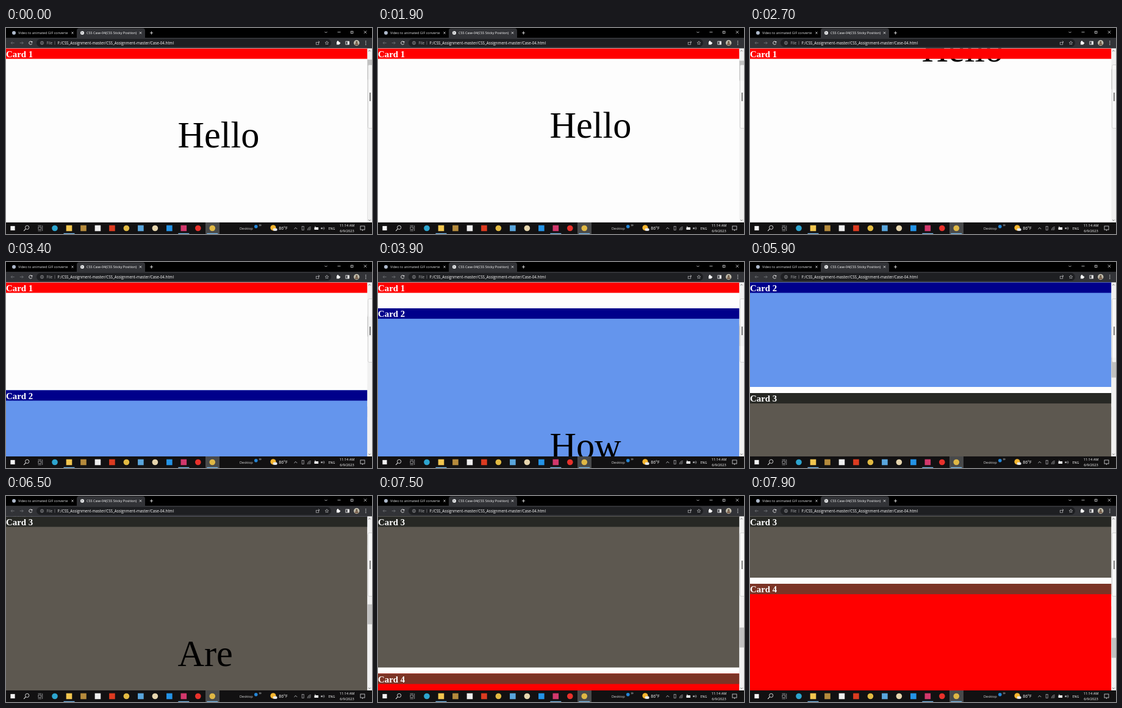
These frames come from a looping animation (600 by 338 pixels, 8 s). An HTML page with a canvas:

```html
<!DOCTYPE html>
<html lang="en">
<head>
<meta charset="utf-8">
<title>Sticky cards</title>
<style>
html, body { margin: 0; width: 100%; height: 100%; overflow: hidden; background: #000; }
canvas { display: block; width: 600px; height: 338px; }
</style>
</head>
<body>
<canvas id="stage" width="600" height="338"></canvas>
<script>
const ctx = document.getElementById('stage').getContext('2d');
const LOOP = 8000, STEP = 100;
const UI = '"Open Sans", "Noto Sans", sans-serif';
const SERIF = '"Liberation Serif", "Times New Roman", serif';
const PALE = '#dedfe1', WHITE = '#fff', GREY = '#a8a9ab', BAR = '#323337';

// Page geometry
const TOP = 33.5, BOTTOM = 319, PAGE_W = 592.5, VIEW = BOTTOM - TOP;
const PITCH = 590, GAP = 10, HEAD = 17.1, WORD_BASE = 246;
const TRACK_TOP = 41, TRACK_H = 271, PAGE_H = PITCH * 4;

const CARDS = [
  { head: '#ff0000', body: '#fdfdfd', word: 'Hello' },
  { head: '#00008b', body: '#6495ed', word: 'How' },
  { head: '#272824', body: '#5d5850', word: 'Are' },
  { head: '#7b3426', body: '#ff0000', word: '' }
];

// The wheel changes speed at these points and rests briefly at PAUSE.
const PAUSE = 7200;
const WHEEL = [
  { t: 1800, y: 84 }, { t: 2700, y: 225 }, { t: 3900, y: 547.5 },
  { t: 5900, y: 998.5 }, { t: 6500, y: 1180.5 }, { t: 7800, y: 1659.5 }
];

function scrollAt(time) {
  const t = time > PAUSE ? Math.max(PAUSE, time - STEP) : time;
  let y = WHEEL[0].y;
  for (let i = 1; i < WHEEL.length; i++) {
    const a = WHEEL[i - 1], b = WHEEL[i];
    const part = Math.min(1, Math.max(0, (t - a.t) / (b.t - a.t)));
    y += (b.y - a.y) * part;
  }
  return y;
}

function rect(x, y, w, h, color) {
  ctx.fillStyle = color;
  ctx.fillRect(x, y, w, h);
}

function square(x, y, r, color) {
  rect(x - r, y - r, 2 * r, 2 * r, color);
}

function disc(x, y, r, color) {
  ctx.fillStyle = color;
  ctx.beginPath();
  ctx.arc(x, y, r, 0, Math.PI * 2);
  ctx.fill();
}

function round(x, y, w, h, r, color) {
  ctx.fillStyle = color;
  ctx.beginPath();
  ctx.roundRect(x, y, w, h, r);
  ctx.fill();
}

function ring(x, y, r, color, from = 0, to = Math.PI * 2) {
  ctx.strokeStyle = color;
  ctx.lineWidth = 0.8;
  ctx.beginPath();
  ctx.arc(x, y, r, from, to);
  ctx.stroke();
}

function frame(x, y, w, h, color) {
  ctx.strokeStyle = color;
  ctx.lineWidth = 0.8;
  ctx.strokeRect(x, y, w, h);
}

function line(x1, y1, x2, y2, color, width = 0.8) {
  ctx.strokeStyle = color;
  ctx.lineWidth = width;
  ctx.beginPath();
  ctx.moveTo(x1, y1);
  ctx.lineTo(x2, y2);
  ctx.stroke();
}

// Angle mark whose tip points right, turned by a number of quarter turns
function chevron(x, y, r, turns, color) {
  ctx.save();
  ctx.translate(x, y);
  ctx.rotate(turns * Math.PI / 2);
  line(-r / 2, -r, r / 2, 0, color);
  line(-r / 2, r, r / 2, 0, color);
  ctx.restore();
}

function cross(x, y, r, color) {
  line(x - r, y - r, x + r, y + r, color);
  line(x - r, y + r, x + r, y - r, color);
}

function text(str, x, y, size, color = WHITE, family = UI, weight = 400) {
  ctx.font = `${weight} ${size}px ${family}`;
  ctx.fillStyle = color;
  ctx.fillText(str, x, y);
}

function clipped(x, y, w, h, paint) {
  ctx.save();
  ctx.beginPath();
  ctx.rect(x, y, w, h);
  ctx.clip();
  paint();
  ctx.restore();
}

function drawCard(card, i, scroll) {
  const y = TOP + i * PITCH - scroll;
  const end = y + PITCH - GAP;
  rect(0, y, PAGE_W, end - y, card.body);
  text(card.word, 281.4, y + WORD_BASE, 60.3, '#000', SERIF);
  const headY = Math.min(Math.max(y, TOP), end - HEAD - GAP);
  rect(0, headY, PAGE_W, HEAD, card.head);
  text(`Card ${i + 1}`, 0, headY + 14.2, 14.9, WHITE, SERIF, 700);
}

function drawPage(scroll) {
  clipped(0, TOP, PAGE_W, VIEW, () => {
    rect(0, TOP, PAGE_W, VIEW, '#fdfdfd');
    CARDS.forEach((card, i) => drawCard(card, i, scroll));
  });
}

function drawScrollbar(scroll) {
  rect(PAGE_W, TOP, 8, VIEW, '#f1f1f1');
  const thumbY = TRACK_TOP + (scroll + GAP) / PAGE_H * TRACK_H;
  rect(PAGE_W, thumbY, 8, TRACK_H * VIEW / PAGE_H, '#c1c1c1');
  chevron(596, 37.5, 1.8, -1, '#505050');
  chevron(596, 315.5, 1.8, 1, '#505050');
  round(593.5, 60.5, 12, 104, 2, 'rgba(250,250,250,.88)');
  ctx.strokeStyle = '#c9c9c9';
  ctx.lineWidth = 0.8;
  ctx.stroke();
  rect(596.2, 106, 1.4, 14, '#444');
}

function drawTabs() {
  rect(0, 0, 600, 17, '#000');
  disc(13, 8, 3, '#aeb9cb');
  clipped(20, 0, 81, 16, () => text('Video to animated GIF converter', 20, 9.9, 5.55, PALE));
  cross(109, 8, 1.6, PALE);

  round(116, 0.5, 112, 20, 4, BAR);
  disc(125, 8, 3.1, '#e4e5e7');
  chevron(124.5, 8, 1.7, 0, '#55585c');
  text('CSS Case-04(CSS Sticky Position)', 132, 9.9, 5.5);
  cross(220.5, 8, 1.6, WHITE);
  line(236, 8, 241, 8, WHITE);
  line(238.5, 5.5, 238.5, 10.5, WHITE);

  chevron(524.5, 7, 2, 1, PALE);
  line(543.5, 6.8, 548.5, 6.8, PALE);
  frame(565.5, 5.3, 3.4, 3.4, PALE);
  cross(589, 6.8, 2.2, PALE);
}

function drawToolbar() {
  rect(0, 16, 600, 17.5, BAR);
  for (const side of [-1, 1]) {
    const x = 18.2 + side * 7.2;
    line(x - 2.7, 24.5, x + 2.7, 24.5, '#77797d');
    chevron(x + side * 1.7, 24.5, 2.2, 1 - side, '#77797d');
  }
  ring(40.3, 24.5, 2.6, WHITE, 0.3, 5.5);
  square(42.4, 22.9, 0.9, WHITE);

  round(50, 18, 483, 13, 6.5, '#1e1f22');
  ring(59, 24.5, 2.5, GREY);
  line(59, 23, 59, 26, GREY);
  text('File', 66.5, 26.6, 6.2, GREY);
  line(80, 21.5, 80, 27.5, '#74767a');
  text('F:/CSS_Assignment-master/CSS_Assignment-master/Case-04.html', 84.5, 26.6, 6.25);

  frame(508.3, 23.5, 4.4, 3.6, GREY);
  chevron(513, 23, 1.7, 0, PALE);
  ctx.beginPath();
  for (let i = 0; i < 10; i++) {
    const a = -Math.PI / 2 + i * Math.PI / 5, r = i % 2 ? 1.4 : 3;
    ctx.lineTo(526 + r * Math.cos(a), 24.6 + r * Math.sin(a));
  }
  ctx.closePath();
  ctx.stroke();

  square(544.3, 25, 2.3, WHITE);
  disc(544, 22.3, 1.2, WHITE);
  disc(546.9, 24.8, 1.2, WHITE);
  frame(557, 22, 5.5, 5, WHITE);
  rect(559.8, 22, 2.8, 5, WHITE);
  disc(574.8, 24.5, 4.7, '#c3bfae');
  disc(574.8, 23.2, 1.6, '#62513f');
  round(572, 25, 5.6, 3.2, 1.5, '#795f4c');
  for (let i = -1; i <= 1; i++) disc(589.8, 24.5 + i * 2.7, 0.75, PALE);
}

const APPS = [
  [disc, '#2da5cf'], [square, '#f2c64f'], [square, '#b58a3c'], [square, '#eeeeee'],
  [square, '#dc3b20'], [disc, '#e2ba42'], [square, '#59a5dc'], [disc, '#e6d5ad'],
  [square, '#2493e6'], [square, '#d2386c'], [disc, '#e8312b'], [disc, '#dfb744']
];
const OPEN_APPS = [1, 9, 11];

function drawApps() {
  const appX = i => 80 + i * 23.48;
  rect(327, BOTTOM, 23, 19, '#48494a');
  square(11, 328.5, 3.6, '#f3f3f3');
  ring(34.7, 327.3, 3.1, WHITE);
  line(32.4, 329.5, 29.2, 333, WHITE, 1.1);
  frame(53, 326.5, 4.4, 4, GREY);
  for (const y of [324.3, 332.7]) line(52.5, y, 58, y, GREY);
  line(59.7, 324, 59.7, 333, GREY);
  APPS.forEach(([shape, color], i) => shape(appX(i), 328.5, 4.8, color));
  OPEN_APPS.forEach(i => rect(appX(i) - 9, 336.7, 18, 1.3, '#79b8e8'));
}

function drawTray() {
  text('Desktop', 383, 330.9, 5.6, '#d9d9d9');
  disc(409.8, 325.7, 2.8, '#2586d7');
  for (const x of [415.6, 417.6]) chevron(x, 323.6, 1.3, 0, PALE);

  disc(438, 327.8, 4.6, '#f5b52f');
  for (const x of [440, 442.4]) disc(x, 330.8, 2.3, '#e7e9ee');
  text('86°F', 447.3, 331, 6.8);

  chevron(474.8, 328.7, 2.4, -1, PALE);
  frame(485.2, 325.5, 3, 6, GREY);
  for (let i = 1; i <= 3; i++) ring(499.7, 331.8, i * 1.8, GREY, Math.PI, Math.PI * 1.5);
  rect(505.5, 327, 6.6, 4, '#f2f2f2');
  line(506, 325.3, 508, 327, '#f2f2f2');
  square(517.6, 328.7, 1.3, GREY);
  for (const r of [1.7, 3.1]) ring(518.8, 328.7, r, GREY, -0.9, 0.9);

  text('ENG', 528.5, 330.9, 5.4);
  ctx.textAlign = 'center';
  text('11:14 AM', 559, 326.4, 5.7);
  text('6/9/2023', 559, 334.9, 5.7);
  ctx.textAlign = 'left';
  frame(581, 325, 7, 6, PALE);
  line(584.5, 331, 584.5, 333, PALE);
}

function draw(now) {
  const t = Math.floor(now % LOOP / STEP) * STEP;
  const scroll = scrollAt(t);
  drawTabs();
  drawToolbar();
  drawPage(scroll);
  drawScrollbar(scroll);
  rect(0, BOTTOM, 600, 19, '#121112');
  drawApps();
  drawTray();
}

const start = performance.now();
function tick() {
  draw(performance.now() - start);
  requestAnimationFrame(tick);
}
tick();
</script>
</body>
</html>
```
